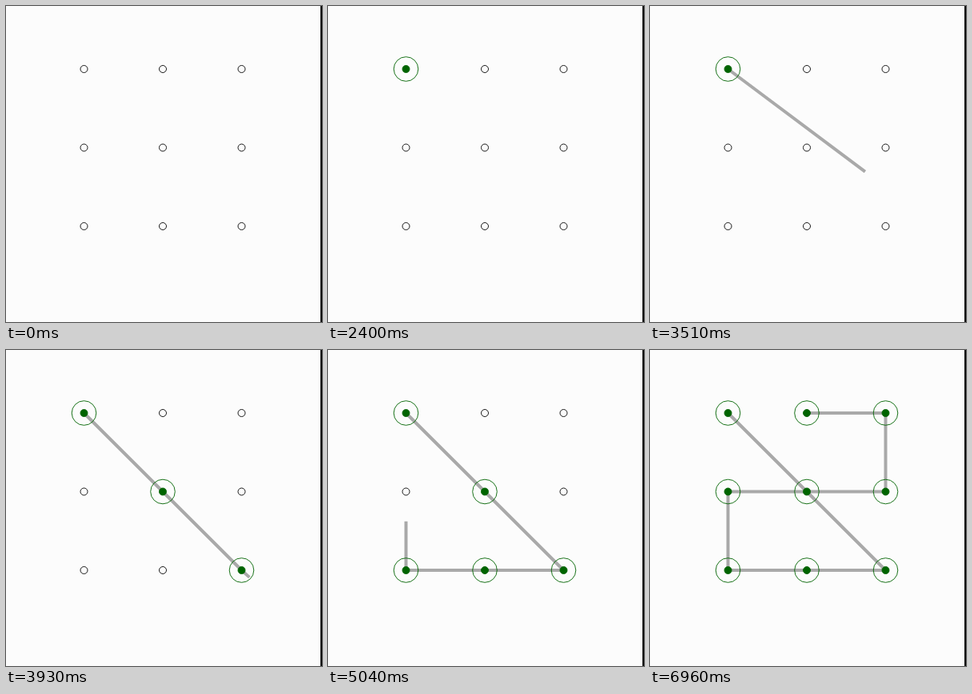
An HTML page with a canvas for the animation above (8.1 s loop, 395x396 px).

```html
<!DOCTYPE html>
<html lang="en">
<head>
<meta charset="utf-8">
<title>Pattern lock</title>
<style>
  html, body { margin: 0; width: 100%; height: 100%; overflow: hidden; background: #fcfcfc; }
  canvas { display: block; }
</style>
</head>
<body>
<canvas id="stage" width="395" height="396"></canvas>
<script>
const ctx = document.getElementById('stage').getContext('2d');
const LOOP = 8100, STEP = 30;
const PITCH = 98.5, LEFT = 97.5, TOP = 79;
const DOT_R = 4.5, RING_R = 15.3;
const GREEN = '#006400', RED = '#ff0000';

// Dots are numbered 0..8, row by row; positions are [column, row].
const cell = i => [i % 3, Math.floor(i / 3)];
const toStage = ([col, row]) => [LEFT + PITCH * col, TOP + PITCH * row];

// The pointer passes through a few keys: [time, column, row].
const gestures = [
  {
    release: 1170, end: 2400, result: RED,
    keys: [[690, 0, 0], [1020, 1.2, 0]]
  },
  {
    release: 6960, end: LOOP, result: GREEN,
    keys: [
      [2400, 0, 0], [2910, 0.72, 0.41], [3000, 0.72, 0.41],
      [3210, 1.14, 0.43], [3510, 1.74, 1.305], [3930, 2.1, 2.09],
      [4680, 0, 2], [5310, 0, 1], [5800, 2, 1], [6120, 2, 0], [6450, 0.81, 0]
    ]
  }
];

// Monotone cubic: flows through the keys and slows to rest at turns.
function interpolate(keys, axis, t) {
  const rate = i => keys[i] && keys[i + 1]
    ? (keys[i + 1][axis] - keys[i][axis]) / (keys[i + 1][0] - keys[i][0]) : 0;
  const slope = i => {
    const a = rate(i - 1), b = rate(i);
    return a * b > 0 ? 2 * a * b / (a + b) : 0;
  };
  const next = keys.findIndex(k => k[0] > t);
  if (next < 0) return keys[keys.length - 1][axis];
  const i = next - 1, span = keys[next][0] - keys[i][0];
  const u = (t - keys[i][0]) / span, v = 1 - u;
  return keys[i][axis] * v * v * (1 + 2 * u)
    + keys[next][axis] * u * u * (1 + 2 * v)
    + span * u * v * (slope(i) * v - slope(next) * u);
}

const pointer = (g, t) => [interpolate(g.keys, 1, t), interpolate(g.keys, 2, t)];

// A jump across the grid also picks up the dot halfway.
function middle(a, b) {
  const [c0, r0] = cell(a), [c1, r1] = cell(b);
  const even = (c0 + c1) % 2 === 0 && (r0 + r1) % 2 === 0;
  return even ? (a + b) / 2 : b;
}

// Walk the path once and note when each dot is reached.
function findHits(g) {
  const hits = [];
  const add = (t, dot) => {
    if (!hits.some(h => h.dot === dot)) hits.push({ t, dot });
  };
  for (let t = g.keys[0][0]; t < g.release; t += STEP) {
    const [x, y] = pointer(g, t);
    const dot = Math.round(x) + 3 * Math.round(y);
    const [col, row] = cell(dot);
    if (Math.hypot(x - col, y - row) * PITCH > RING_R) continue;
    if (hits.length) add(t, middle(hits[hits.length - 1].dot, dot));
    add(t, dot);
  }
  return hits;
}
gestures.forEach(g => { g.hits = findHits(g); });

function circle([x, y], r) {
  ctx.beginPath();
  ctx.arc(x, y, r, 0, 2 * Math.PI);
}

function drawLine(points) {
  ctx.beginPath();
  points.forEach(p => ctx.lineTo(...toStage(p)));
  ctx.strokeStyle = '#a9a9a9';
  ctx.lineWidth = 4;
  ctx.stroke();
}

function drawDot(i, color) {
  const p = toStage(cell(i));
  ctx.lineWidth = 0.9;
  ctx.strokeStyle = color || '#000';
  circle(p, DOT_R);
  if (color) {
    ctx.fillStyle = color;
    ctx.fill();
  }
  ctx.stroke();
  if (color) {
    circle(p, RING_R);
    ctx.stroke();
  }
}

function draw(t) {
  ctx.fillStyle = '#fcfcfc';
  ctx.fillRect(0, 0, 395, 396);
  ctx.fillStyle = '#111';
  ctx.fillRect(393, 0, 2, 396);

  const g = gestures.find(s => t >= s.keys[0][0] && t < s.end);
  let active = [], color = GREEN;
  if (g) {
    active = g.hits.filter(h => t >= h.t).map(h => h.dot);
    const points = active.map(cell);
    if (t < g.release) points.push(pointer(g, t));
    else color = g.result;
    drawLine(points);
  }
  for (let i = 0; i < 9; i++) drawDot(i, active.includes(i) && color);
}

const began = performance.now();
function tick() {
  const t = (performance.now() - began) % LOOP;
  draw(Math.floor(t / STEP) * STEP);
  requestAnimationFrame(tick);
}
tick();
</script>
</body>
</html>
```
